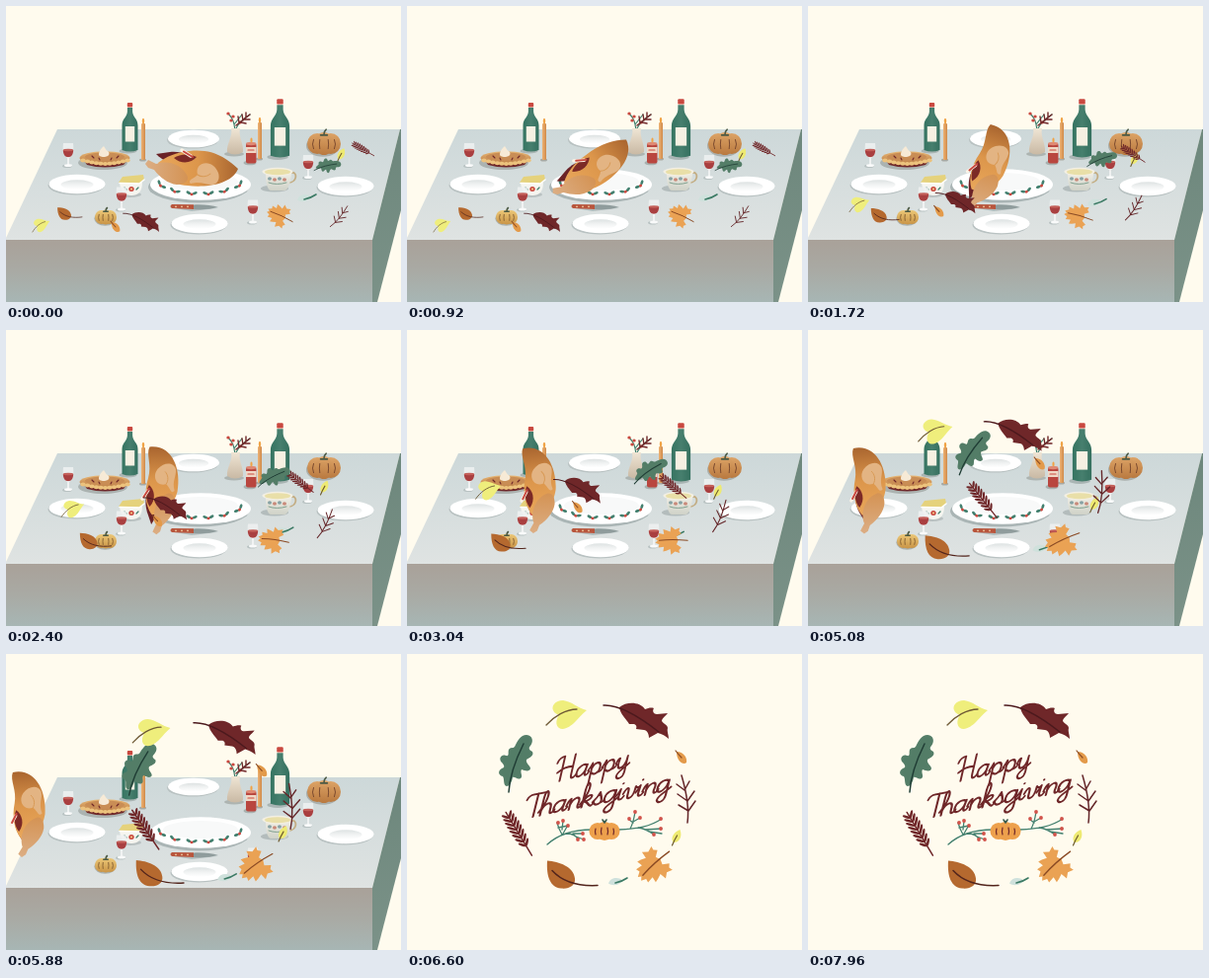
Animation of 400x300 px, one loop 8 s. Source, as an HTML page:

```html
<!DOCTYPE html>
<html lang="en">
<head>
<meta charset="utf-8">
<title>Happy Thanksgiving</title>
<style>
html, body { margin: 0; width: 100%; height: 100%; overflow: hidden; background: #fffbee; }
svg { display: block; width: 100vw; height: 100vh; }
.line { fill: none; stroke-linecap: round; stroke-linejoin: round; }
</style>
</head>
<body>
<svg id="stage" viewBox="0 0 400 300" role="img" aria-label="Happy Thanksgiving"></svg>
<script>
const LOOP = 8000;
const MAROON = '#6f2729', GREEN = '#43806f', RED = '#c9483f';

// Markup helpers
const path = (d, fill, more = '') => `<path d="${d}" fill="${fill}" ${more}/>`;
const line = (d, color, w = 1) => `<path class="line" d="${d}" stroke="${color}" stroke-width="${w}"/>`;
const oval = (x, y, rx, ry, fill, more = '') =>
  `<ellipse cx="${x}" cy="${y}" rx="${rx}" ry="${ry}" fill="${fill}" ${more}/>`;
const box = (x, y, w, h, fill, r = 0) =>
  `<rect x="${x}" y="${y}" width="${w}" height="${h}" rx="${r}" fill="${fill}"/>`;
const at = (x, y, body, more = '') => `<g transform="translate(${x} ${y}) ${more}">${body}</g>`;
const grad = (id, dir, ...stops) =>
  `<linearGradient id="${id}" x1="0" y1="0" x2="${dir === 'x' ? 1 : 0}" y2="${dir === 'y' ? 1 : 0}">` +
  stops.map((c, i) => `<stop offset="${i / (stops.length - 1)}" stop-color="${c}"/>`).join('') +
  '</linearGradient>';

const defs = '<defs>' +
  grad('top', 'y', '#cdd8d9', '#dfe3e2') +
  grad('front', 'y', '#a9a199', '#a9aaa4', '#a7b6b4') +
  grad('side', 'y', '#6d877c', '#7b9288') +
  grad('glass', 'x', '#357461', '#477f6e', '#35705f') +
  grad('wax', 'x', '#eeb374', '#cf8a4a') +
  grad('dish', 'y', '#dde2e2', '#f1f3f3', '#fff') +
  grad('clay', 'y', '#efe5d4', '#c9b9a4') +
  grad('squash', 'y', '#dda467', '#b9793f') +
  grad('gourd', 'y', '#ecc878', '#c99446') +
  grad('crust', 'y', '#e8b673', '#b97a44') +
  grad('roast', 'x', '#e9a75b', '#dc964b', '#a9652f') +
  grad('meat', 'x', '#dcae84', '#d49354') +
  grad('cup', 'y', '#f4f1e8', '#cfd2c8') + '</defs>';

// Table and dishes
const plate = (x, y, rx = 28.5, ry = 9.7) =>
  oval(x - 1, y + 1.3, rx, ry, '#b9c2c2') + oval(x, y, rx, ry, '#fff') +
  oval(x, y + .6, rx * .58, ry * .5, 'url(#dish)');

const wine = (x, y) => at(x, y,
  oval(-1, 12.2, 5, 1.8, '#b9c3c3') +
  path('M-5,-11 C-6,-3 -5,3 0,4 C5,3 6,-3 5,-11Z', '#eef1f1', 'opacity=".85"') +
  path('M-5.2,-4 C-5,1 -3,3 0,3.3 C3,3 5,1 5.2,-4Z', '#a93f40') +
  oval(0, -4, 5.2, 1.2, '#c4605a') + line('M0,4 V11', '#f6f7f7', 1.6) + oval(0, 11.6, 4, 1.5, '#f9fafa'));

const bottle = (x, y, s) => at(x, y,
  oval(-2, 0, 9, 2.5, '#aab5b4') +
  path('M-2.6,-44 H2.6 V-40 C3,-34 8,-33 8,-26 V-1 Q0,2 -8,-1 V-26 C-8,-33 -3,-34 -2.6,-40Z', 'url(#glass)') +
  box(-2.7, -49, 5.4, 4.5, RED, 1) + box(-4.7, -25, 9.4, 15.5, '#f6f0e2'), `scale(${s})`);

const candle = (x, y) => oval(x - .5, y, 3.5, 1.5, '#a7a9a3') +
  box(x - 2, y - 37, 4, 37, 'url(#wax)', 1) + oval(x, y - 39.5, 1.2, 2.8, '#f0a345');

const pumpkin = (x, y, rx, ry, fill, ink) => at(x, y,
  oval(-.06, .2, 1, .95, '#aab0ad') + oval(-.4, 0, .6, .92, fill) + oval(.4, 0, .6, .92, fill) +
  oval(0, 0, .55, 1, fill), `scale(${rx} ${ry})`) +
  [-.62, -.25, .25, .62].map(k =>
    line(`M${x + rx * k},${y - ry * .35} q${rx * k * .2},${ry * .4} 0,${ry * .8}`, ink, 1)).join('') +
  line(`M${x},${y - ry * .8} q0,${-ry * .3} ${rx * .13},${-ry * .45} M${x - rx * .2},${y - ry * .75} h${rx * .4}`, '#4b5a46', 1.6);

const holly = (x, y, a) => at(x, y,
  oval(-3.4, -.4, 2.6, 1.4, GREEN, 'transform="rotate(25 -3 0)"') +
  oval(3.4, -.4, 2.6, 1.4, GREEN, 'transform="rotate(-25 3 0)"') + oval(0, .8, 1.6, 1.4, RED), `rotate(${a})`);

const platter = () => oval(195, 183.5, 51, 16, '#aab5b5') + oval(197, 181, 51, 15.8, '#fff') +
  oval(197, 178, 38, 9, '#f8f9f9') +
  [[157, 181.5, 45], [171, 187.5, 20], [188, 190, 5], [205, 190, -5], [221, 187.5, -20], [236, 181.5, -45]]
    .map(h => holly(...h)).join('');

const pie = () => at(100, 155,
  oval(-2, 4, 25, 7, '#abb3b1') + path('M-23,-1 L-18,6 Q0,11 19,6 L25,-1Z', MAROON) +
  oval(0, -1, 25.5, 6.8, 'url(#crust)') + oval(0, -2.2, 20, 4.3, '#c98d55') +
  Array.from({ length: 11 }, (_, i) => oval(-22 + i * 4.5, 1.5 + 3.4 * Math.sin(Math.PI * i / 10), 2.7, 2, '#ecc27d')).join('') +
  line('M-13,-3 l2,2 M-6,-1 l1,2 M7,-1 l-1,2 M14,-3 l-2,2', MAROON, 1.1) +
  path('M-6,-4 Q-6,-9 -1,-13 Q1,-9 4,-7 Q6,-3 0,-2 Q-5,-2 -6,-4Z', '#f7ead6'));

const sauce = () => at(127, 181,
  oval(-1, 10, 11, 3, '#b9c1c1') + path('M-12,-2 H11 C11,7 7,11 0,11 C-7,11 -11,7 -12,-2Z', '#f5f5ef') +
  path('M-13,-2 L-9,-8 L12,-10 L13,-5 L8,-1Z', '#e5d27c') +
  line('M-12,-1.5 L8,-1 L13,-5', '#fff', 1.6) +
  oval(0, 4.5, 2.7, 2.5, RED) + oval(0, 4.5, 1, 1, '#f4d58d') + line('M-7,3 l2,2 M5,5 l2,-2', GREEN, 1.3));

const mug = () => at(275, 175,
  oval(-3, 10, 14, 3.5, '#b3bcbc') + line('M13,-6 C21,-8 20,4 11,4', '#c3ad83', 1.8) +
  path('M-16,-8 L-12,-6 C-12,6 -10,11 -7,12 H8 C12,9 14,0 14,-7Z', 'url(#cup)') +
  oval(0, -7, 15.5, 4.2, '#f3efe2') + oval(0, -6.8, 13, 3, '#e9dfa8') +
  [-8, -3, 2, 7].map((x, i) => oval(x, 0 + i % 2, 2, 1.7, i % 2 ? '#c98a7a' : '#86a2a4')).join('') +
  line('M-9,4 q8,3 18,0', '#7fa08f', 1));

const vase = () => line('M232,126 C231,118 230,114 225,109 M231,120 L239,110 M233,124 C236,118 239,115 247,110', GREEN, 1.2) +
  [[225, 109], [230, 112], [228, 116], [237, 118]].map(p => oval(...p, 1.7, 1.5, RED)).join('') +
  line('M233,121 L247,110 M236,118 l-1,-6 M240,116 l-1,-6 M243,113 l0,-5 M238,118 l5,1 M241,115 l6,0', MAROON, 1.4) +
  oval(231, 150, 10, 2.6, '#adb4b1') +
  path('M228,124 H237 C235,132 241,140 240,148 Q232,153 224,148 C223,140 230,132 228,124Z', 'url(#clay)');

const redCandle = () => oval(247, 159, 6.5, 2.3, '#a8b1af') + box(243, 139, 10.5, 20.5, '#b9463f', 2) +
  oval(248.2, 139.5, 5.2, 1.7, '#df8a75') + box(243, 143, 10.5, 6, '#f0d8c6') +
  line('M245,146 h6', RED, 1.2) + oval(248.5, 136, 1.1, 2.4, '#f0a345');

const knife = () => path('M165,204 L190,206 L214,205 L188,208Z', '#b2bcbc') +
  path('M190,201.5 C200,201 208,202 215,204 Q203,207 190,206Z', '#8f9c9c') +
  path('M168,201 L190,201.3 V206 L168,205 Q165,203 168,201Z', '#b8553c') +
  [172, 178, 184].map(x => oval(x, 203.3, 1, .9, '#eac29a')).join('');

const table = path('M52,125 H399 L371,237 H0 V235Z', 'url(#top)') +
  path('M399,125 H400 V207 L376,300 H371 V237Z', 'url(#side)') + box(0, 237, 371, 63, 'url(#front)') +
  plate(190, 134.5, 26, 8.8) + plate(72, 180.5) + plate(344, 182.5) + plate(196, 220.5) +
  bottle(125.5, 147, 1) + candle(139, 156) + vase() + candle(257, 155) + bottle(277.5, 153, 1.2) +
  redCandle() + pumpkin(322, 139.5, 17, 11.5, 'url(#squash)', '#7b4a2f') + wine(63, 150) + pie() +
  platter() + sauce() + mug() + wine(117, 194.5) + wine(306, 162) + wine(250, 207.5) +
  pumpkin(101, 214, 11, 7.6, 'url(#gourd)', '#8b6535') + knife();

// Bird: the body bends from lying to standing
const LYING = 'M45,0 C36,-8 22,-21 -4,-18 C-18,-17 -28,-12 -36,-6 C-32,6 -24,16 -6,17 C10,19 38,17 45,0Z';
const STANDING = 'M43,-12 C35,-16 24,-9 10,-13 C-4,-17 -18,-16 -28,-9 C-30,2 -20,14 -4,18 C20,22 46,12 43,-12Z';
const mix = (a, b, k) => a + (b - a) * k;
const morph = (a, b, k) => {
  const to = b.match(/-?[\d.]+/g);
  let i = 0;
  return a.replace(/-?[\d.]+/g, n => mix(+n, +to[i++], k).toFixed(2));
};
const bird =
  `<g id="backLeg">${path('M-38,-15 L-24,-17 C-12,-18 -2,-14 -2,-7 C-14,-1 -28,-5 -38,-15Z', '#6a2226')}</g>` +
  `<path id="body" fill="url(#roast)"/>` +
  path('M-20,-11 C-14,-15 -5,-16 3,-12 C-2,-6 -12,-4 -20,-11Z', '#7c2a26') +
  line('M-12,-19 L-3,-13', '#fbf3e6', 3.4) + line('M-10,-17.5 L-1,-12', RED, 2) +
  path('M4,6 C1,-5 13,-9 20,-3 C28,4 27,14 20,16 C12,17 8,12 -3,15 C-7,11 1,10 4,6Z', '#e3b483') +
  line('M4,6 C8,9 14,8 17,5', '#d89a56', 1) +
  `<g id="frontLeg">${path('M-6,8 C-12,-6 -28,-9 -38,-5 L-46,-9 L-49,-5 L-46,-1 L-40,1 C-34,9 -26,15 -17,16 C-10,16 -5,13 -6,8Z', 'url(#meat)')}</g>`;

// Time, x, y, angle of the bird
const WALK = [[0, 190, 165, 0], [840, 190, 165, -33], [1680, 184, 163, -70], [2300, 160, 160, -88],
  [3040, 133, 160, -96], [3920, 109, 162, -90], [4250, 89, 161, -97], [5080, 61, 160, -95],
  [5880, 22, 160, -95], [6600, -12, 160, -97]];
const poseAt = t => {
  let i = 0;
  while (i < WALK.length - 2 && t > WALK[i + 1][0]) i++;
  const a = WALK[i], b = WALK[i + 1], k = Math.min(1, (t - a[0]) / (b[0] - a[0]));
  return a.map((v, j) => mix(v, b[j], k));
};

// Leaves: from (x, y, turn, scale) on the table to (X, Y) in the wreath
const fern = () => {
  let s = line('M0,-24 V27', MAROON, 1.5);
  for (let i = 0; i < 8; i++) {
    const y = -17 + i * 4.7, r = 3.6 + 1.6 * Math.sin(Math.PI * (i + 1) / 9);
    for (const d of [-1, 1]) s += oval(d * r, y, r, 1.3, MAROON, `transform="rotate(${-d * 48} 0 ${y})"`);
  }
  return `<g transform="rotate(-31)">${s}</g>`;
};
const twig = line('M2,23 C4,8 1,-8 -4,-25 M3,11 L10,1 M3,11 L-7,5 M2,1 L9,-9 M2,1 L-8,-6 M-1,-10 L4,-19 M-1,-10 L-9,-16', '#642629', 1.5);
const maple = '<g transform="rotate(-42)">' +
  path('M11,0 L9,-5 L15,-9 L12,-12 L13,-16 L7,-14 L2,-18 L1,-11 L-4,-13 L-8,-14 L-7,-8 L-14,-9 L-13,-5 L-18,-2 L-15,0 L-18,3 L-13,5 L-14,9 L-7,8 L-8,14 L-4,13 L1,11 L2,18 L7,14 L13,16 L12,12 L15,9 L9,5Z', '#eaa254') +
  line('M-13,0 Q4,-2 23,0', '#8a4a24', 1.3) + '</g>';

const leaves = [
  { x: 305, y: 194.5, X: 214, Y: 230.5, turn: 0, s: 1,
    art: path('M-10,2 C-8,-4 0,-5 4,-1 C2,4 -6,5 -10,2Z', '#cfe1dc') + line('M-3,1.5 Q4,0 9,-3.5', '#3b7a64', 1.6) },
  { x: 339, y: 151, X: 272.5, Y: 186, turn: 0, s: .85,
    art: path('M4,-8 C7,0 2,6 -3,5 C-6,0 -2,-6 4,-8Z', '#eeea72') + line('M1,-2 Q-2,3 -4,8', '#6d5a2e', 1.2) },
  { x: 276, y: 212, X: 248.5, Y: 215.5, turn: 67, s: .68, art: maple },
  { x: 337, y: 214, X: 282, Y: 148, turn: 47, s: .56, art: twig },
  { x: 62, y: 210, X: 162, Y: 223.5, turn: -5, s: .47,
    art: path('M-20,-14 C-8,-13 7,-8 8,4 C9,11 2,15 -6,14 C-17,13 -21,2 -20,-14Z', '#b5692f') +
      line('M-15,-4 C-4,8 12,12 31,11', '#53251c', 1.5) },
  { x: 139, y: 219, X: 236, Y: 68, turn: 0, s: .55,
    art: path('M-21,-14 C-14,-20 0,-20 5,-12 C8,-13 11,-14 14,-13 C12,-10 14,-7 17,-7 L28,-8 C26,-5 22,-3 22,0 C24,3 28,4 28,7 C27,10 29,14 29,18 C26,15 22,13 18,12 L9,17 C9,13 7,9 4,9 L-4,8 C-3,5 -4,4 -6,3 L-11,3 C-14,-2 -20,-7 -21,-14Z', MAROON) +
      line('M-37,-16 C-20,-17 0,-4 19,11', '#4c191d', 1.5) },
  { x: 361, y: 145, X: 112.5, Y: 181, turn: -29, s: .5, art: fern() },
  { x: 325, y: 162, X: 110, Y: 111, turn: 57, s: .46,
    art: path('M11,-29 C18,-28 18,-22 15,-18 C12,-15 15,-13 17,-12 C19,-8 14,-6 11,-4 C10,0 15,2 15,5 C14,9 9,7 6,6 C4,9 8,13 5,15 C2,17 -1,13 -3,14 C-4,19 -6,23 -9,23 C-13,22 -11,16 -13,13 C-18,12 -18,7 -14,5 C-10,4 -12,1 -14,-1 C-18,-5 -14,-10 -10,-8 C-6,-7 -8,-11 -7,-14 C-5,-17 -3,-15 -1,-17 C2,-23 5,-29 11,-29Z', '#537d67') +
      line('M-7,29 C-6,12 1,-6 8,-20', '#203d35', 1.5) },
  { x: 35, y: 222, X: 161, Y: 61, turn: -12, s: .47,
    art: path('M21,-4 C12,-6 6,-13 -3,-14 C-11,-14 -15,-8 -13,-4 C-12,-1 -9,0 -7,1 C-10,5 -11,11 -7,14 C-2,17 5,12 9,8 C13,4 16,0 21,-4Z', '#efee7c') +
      line('M-20,11 C-12,2 0,-5 11,-5', '#6f5a35', 1.3) },
  { x: 111, y: 224, X: 278, Y: 105, turn: 0, s: .85,
    art: path('M-5,-6 C2,-6 6,0 5,5 C2,8 -5,4 -5,-6Z', '#e39a4a') + line('M-6,-7 Q-3,-3 0,0', '#8a4a24', 1.2) }
];

// Monoline script: advance and stroke for each letter
const STEM = 'M0,-3 C4,-8 6,-16 5,-20 C4,-23 2,-22 2,-16 L2,0 ';
const BOWL = 'M10,-9 C7,-12 1,-10 1,-4 C1,1 6,1 9,-5 L10,-10 ';
const TAIL = 'L10,4 C10,10 4,11 3,7 C3,3 9,1 13,-3';
const GLYPHS = {
  H: [20, 'M0,-17 Q1,-22 6,-22 L6,0 M16,-22 L16,-4 C16,0 18,1 21,-3 M2,-8 Q9,-13 16,-11'],
  T: [13, 'M0,-17 Q1,-21 5,-21 L16,-21 M9,-21 L9,0'],
  a: [12, BOWL + 'L9,-3 C9,0 11,1 13,-3'],
  g: [11, BOWL + TAIL],
  h: [12, STEM + 'M2,-4 C4,-11 10,-12 10,-6 L10,-3 C10,0 12,1 14,-3'],
  i: [6, 'M0,-4 Q2,-7 3,-10 L2.5,-3 C2.5,0 5,1 7,-3 M4,-15 l.1,0'],
  k: [11, STEM + 'M2,-5 C5,-11 10,-11 9,-8 C8,-5 5,-5 3,-5 C7,-5 7,0 10,0 Q11,0 12,-3'],
  n: [12, 'M0,-4 Q1,-9 3,-10 L3,0 M3,-4 C5,-11 11,-12 10.5,-6 L10,-3 C10,0 12,1 14,-3'],
  p: [13, 'M0,-4 Q2,-7 3,-10 L3,10 M3,-5 C5,-11 11,-11 11,-5 C11,1 6,1 4,-1 M9,-1 Q12,0 14,-4'],
  s: [9, 'M0,-3 Q4,-7 5,-11 C6,-7 9,-4 7,-1 C5,1 2,0 1,-2 M7,-1 Q9,-1 10,-3'],
  v: [11, 'M0,-5 Q2,-11 4,-9 C5,-5 3,0 6,0 C9,0 10,-5 10,-10 Q11,-8 13,-9'],
  y: [12, 'M0,-5 Q2,-10 3,-9 C2,-4 2,0 5,0 C8,0 10,-4 10,-10 ' + TAIL]
};
const script = (word, x, y, angle, sx, sy) => {
  let pen = 0;
  const strokes = [...word].map(c => {
    const [w, d] = GLYPHS[c], g = at(pen, 0, line(d, MAROON, 1.9));
    pen += w;
    return g;
  }).join('');
  return at(x, y, strokes, `rotate(${angle}) skewX(-25) scale(${sx} ${sy})`);
};

const berries = pts => pts.map(([x, y]) => oval(x, y, 1.9, 1.9, '#d2524a')).join('');
const title = script('Happy', 148, 130, -12, 1.1, 1.05) +
  script('Thanksgiving', 117, 167, -11, 1.19, 1.04) +
  line('M142,193 C152,184 166,178 187,178 M157,183 C154,178 153,175 152,171 M158,182 L162,175 M161,182 C168,182 172,185 173,188 M168,182 L177,182 M171,185 L179,188 M157,178 L158,169 M153,176 L163,174', GREEN, 1.3) +
  line('M214,178 C234,177 246,175 258,167 M226,177 C229,172 230,166 231,160 M229,171 L225,168 M229,170 L236,166 M234,176 C242,177 246,180 250,183 M241,178 L258,177 M245,180 L258,182', GREEN, 1.3) +
  berries([[158, 169], [153, 171], [163, 174], [173, 188], [178, 182], [179, 188]]) +
  berries([[231, 160], [225, 167], [236, 166], [257, 167], [250, 183], [257, 177]]) +
  oval(193, 179.5, 8.5, 8.6, '#eda04c') + oval(207, 179.5, 8.5, 8.6, '#eda04c') + oval(200, 179.5, 9, 9.4, '#eda04c') +
  line('M191,177 q-1,3 0,6 M197,176 q-1,4 0,7 M203,176 q1,4 0,7 M209,177 q1,3 0,6', MAROON, 1.2) +
  line('M200,171 L198,168 M200,171 L202,168', '#37594c', 1.6);

const stage = document.getElementById('stage');
stage.innerHTML = defs + box(0, 0, 400, 300, '#fffbee') +
  `<g id="scene">${table}<g id="bird">${bird}</g></g><g id="title">${title}</g>` +
  leaves.map(l => `<g class="leaf">${l.art}</g>`).join('');

const el = id => document.getElementById(id);
const scene = el('scene'), titleEl = el('title'), birdEl = el('bird'), body = el('body');
const frontLeg = el('frontLeg'), backLeg = el('backLeg');
const leafEls = stage.querySelectorAll('.leaf');
const ramp = (t, a, b) => Math.max(0, Math.min(1, (t - a) / (b - a)));

function draw(t) {
  const [, x, y, angle] = poseAt(t);
  const stand = ramp(t, 500, 1700);
  const step = 9 * Math.sin(t / 150) * ramp(t, 1700, 2000);
  birdEl.setAttribute('transform', `translate(${x} ${y}) rotate(${angle}) scale(${mix(1, .96, stand)})`);
  body.setAttribute('d', morph(LYING, STANDING, stand));
  frontLeg.setAttribute('transform', `rotate(${step} -14 4)`);
  backLeg.setAttribute('transform', `rotate(${-step - 14 * stand} -8 -8)`);

  const k = ramp(t, 1000, 6500);
  const sway = Math.sin((t - 6600) / 1360 * 2 * Math.PI) * ramp(t, 6600, 6800);
  leaves.forEach((l, i) => leafEls[i].setAttribute('transform',
    `translate(${mix(l.x, l.X, k)} ${mix(l.y, l.Y, k)}) rotate(${mix(l.turn, 0, k) + sway}) scale(${mix(l.s, 1, k)})`));

  scene.setAttribute('opacity', 1 - ramp(t, 6000, 6480));
  titleEl.setAttribute('opacity', ramp(t, 6080, 6520));
}

const start = performance.now();
function tick() {
  draw((performance.now() - start) % LOOP);
  requestAnimationFrame(tick);
}
draw(0);
requestAnimationFrame(tick);
</script>
</body>
</html>
```
